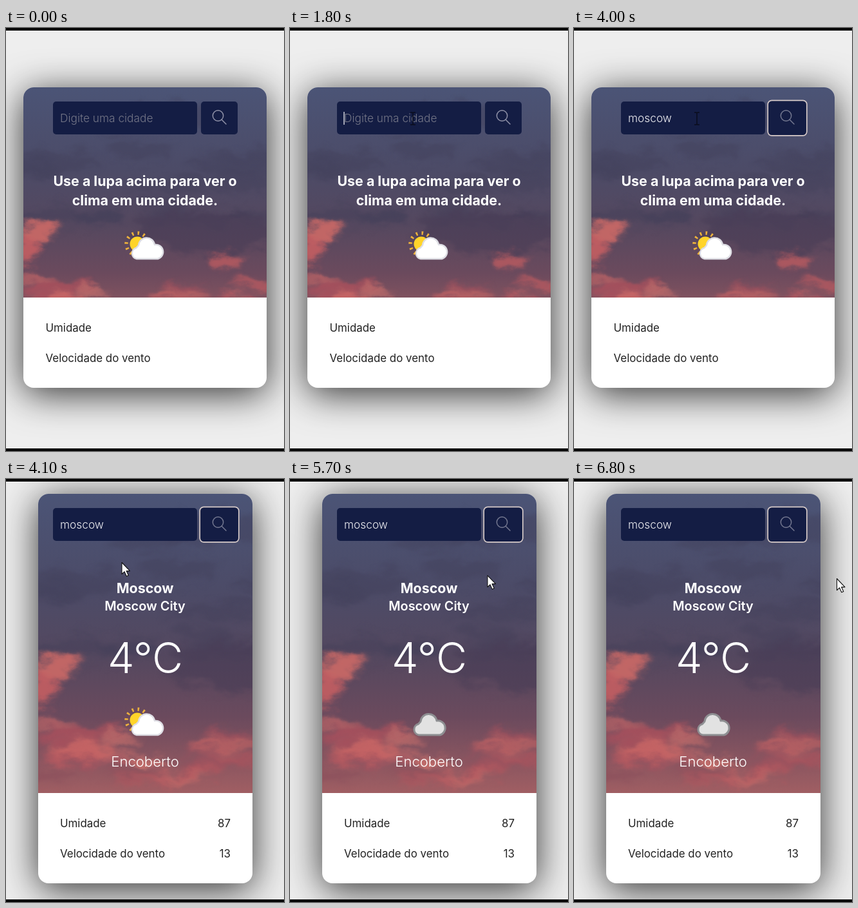
Recreate the animation shown at these times as an HTML page. Size 432 by 656 pixels, loop 7 s.

```html
<!DOCTYPE html>
<html lang="pt">
<head>
<meta charset="utf-8">
<title>Clima</title>
<style>
  html, body { margin: 0; width: 100%; height: 100%; overflow: hidden; background: #eee; }
  svg { display: block; width: 432px; height: 656px; font-family: Inter, sans-serif; }
  .shadow { fill: #fff; filter: drop-shadow(0 9px 29px rgba(0, 0, 0, .8)); }
  .middle { text-anchor: middle; fill: #fff; }
  .title { font-size: 21.4px; font-weight: 700; }
  .region { font-size: 19.9px; font-weight: 600; }
  .degrees { font-size: 66px; font-weight: 300; }
  .sky-text { font-size: 22.1px; font-weight: 300; }
  .field { font-size: 17.3px; font-weight: 300; }
  .info { font-size: 16.9px; fill: #222; }
  .end { text-anchor: end; }
  .button { fill: #141d44; }
</style>
</head>
<body>
<svg viewBox="0 0 432 656">
  <defs>
    <linearGradient id="dusk" x2="0" y2="1">
      <stop stop-color="#4b5476"/>
      <stop offset=".32" stop-color="#4c4b67"/>
      <stop offset=".55" stop-color="#55485f"/>
      <stop offset=".74" stop-color="#6b4a5d"/>
      <stop offset="1" stop-color="#a25f63"/>
    </linearGradient>
    <filter id="cloudy" filterUnits="userSpaceOnUse" x="-20" y="-20" width="420" height="430" color-interpolation-filters="sRGB">
      <feGaussianBlur stdDeviation="5" result="soft"/>
      <feTurbulence type="fractalNoise" baseFrequency=".025 .04" numOctaves="5" seed="4"/>
      <feDisplacementMap in="soft" scale="36" xChannelSelector="R" yChannelSelector="G"/>
    </filter>
    <g id="sky">
      <rect width="378" height="390" fill="url(#dusk)"/>
      <g id="clouds" filter="url(#cloudy)"></g>
    </g>
    <clipPath id="wideClip"><path d="M27 418V108a16 16 0 0 1 16-16H389a16 16 0 0 1 16 16V418Z"/></clipPath>
    <clipPath id="tallClip"><path d="M50 487V39a16 16 0 0 1 16-16H367a16 16 0 0 1 16 16V487Z"/></clipPath>
    <path id="cloud" d="M19 44A8.7 8.7 0 0 1 18.5 27L22 23A12.6 12.6 0 0 1 47 22A11.3 11.3 0 0 1 52 44Z" stroke-linejoin="round"/>
    <g id="sunny">
      <circle cx="20" cy="21" r="17" fill="none" stroke="#eeb23c" stroke-width="5.5" stroke-dasharray="2.6 6.3"/>
      <circle cx="20" cy="21" r="11.5" fill="#ffd42a"/>
      <use href="#cloud" fill="#fff" stroke="#dedee4" stroke-width="2.4"/>
    </g>
    <g id="details">
      <text class="info" x="61.5" y="471">Umidade</text>
      <text class="info" x="61.5" y="518">Velocidade do vento</text>
    </g>
  </defs>

  <rect width="432" height="656" fill="#eee"/>

  <g id="prompt">
    <rect class="shadow" x="27" y="92" width="378" height="466" rx="16"/>
    <g clip-path="url(#wideClip)"><use href="#sky" x="27" y="92"/></g>
    <text class="middle title" x="216" y="245">Use a lupa acima para ver o</text>
    <text class="middle title" x="216" y="275">clima em uma cidade.</text>
    <use href="#sunny" x="184" y="314"/>
    <use href="#details"/>
  </g>

  <g id="result">
    <rect class="shadow" x="50" y="23" width="333" height="604" rx="16"/>
    <g clip-path="url(#tallClip)"><use href="#sky" transform="translate(50 23) scale(1.2)"/></g>
    <text class="middle title" x="216" y="177">Moscow</text>
    <text class="middle region" x="216" y="204">Moscow City</text>
    <text class="middle degrees" x="216.5" y="301">4°C</text>
    <use id="partly" href="#sunny" x="184" y="353"/>
    <use id="overcast" href="#cloud" x="181" y="353" fill="#e2e2e2" stroke="#8e8f92" stroke-width="3"/>
    <text class="middle sky-text" x="216" y="446">Encoberto</text>
    <use href="#details" x="22.5" y="69"/>
    <text class="info end" x="349" y="540">87</text>
    <text class="info end" x="349" y="587">13</text>
  </g>

  <g id="search">
    <rect class="button" x="73" y="114" width="224" height="51" rx="5"/>
    <rect class="button" x="303" y="114" width="57" height="51" rx="5"/>
    <rect id="focus" class="button" x="301.2" y="112.4" width="60.6" height="54.4" rx="6" stroke="#d6cac8" stroke-width="1.7"/>
    <g id="lens" fill="none" stroke-width="1.5" stroke-linecap="round">
      <circle cx="329.5" cy="136" r="8.2"/><path d="M335.5 142.5L342 149"/>
    </g>
    <text id="query" class="field" x="84" y="146"></text>
    <path id="caret" d="M0 130V150" stroke="#fff" stroke-width="1.2"/>
  </g>

  <path id="beam" d="M-4-9.5H-1L0-8.5L1-9.5H4M0-8.5V8.5M-4 9.5H-1L0 8.5L1 9.5H4" fill="none" stroke="#0a0c1c" stroke-width="1.5"/>
  <path id="arrow" d="M.5.5V18.5L4.6 14.7L7.8 21.8L10.8 20.4L7.6 13.6H13Z" fill="#fff" stroke="#111" stroke-width="1.1" stroke-linejoin="round"/>
  <path d="M0 0H432V4H0ZM0 652H432V656H0Z" fill="#000"/>
</svg>
<script>
const el = id => document.getElementById(id);
const show = (id, on) => { el(id).style.display = on ? '' : 'none'; };
const clamp = (v, low, high) => Math.min(high, Math.max(low, v));

let seed = 11;
const random = () => (seed = seed * 16807 % 2147483647) / 2147483647;

const puff = (x, y, rx, ry, color, opacity) =>
  `<ellipse cx="${x}" cy="${y}" rx="${rx}" ry="${ry}" fill="${color}" opacity="${opacity}"/>`;

// From dull mauve (0) to bright coral (1).
const glow = k => `hsl(${347 + 18 * k} ${27 + 30 * k}% ${43 + 22 * k}%)`;

function paintClouds() {
  let art = '';
  for (let i = 0; i < 14; i++) {
    art += puff(random() * 378, 40 + random() * 200, 40 + random() * 50, 8 + random() * 12, '#413c57', .35);
  }
  art += puff(280, 225, 110, 34, '#483d56', .6);
  art += puff(22, 222, 26, 14, glow(.8), .9) + puff(8, 252, 18, 24, glow(.65), .9);
  art += puff(318, 268, 26, 14, glow(.6), .75);
  for (let i = 0; i < 30; i++) {
    const depth = random();
    art += puff(random() * 378, 296 + depth * 90, 18 + random() * 32, 4 + random() * 5, glow(random()), .75);
  }
  el('clouds').innerHTML = art;
}

// Pointer moves: start, end, then the point it settles on.
const entry = [415, 370];
const moves = [
  [100, 400, 345, 255], [800, 900, 281, 204], [1100, 1500, 191, 140.5],
  [4000, 4100, 179.5, 129], [5400, 6300, 408, 154]
];

function pointerAt(t) {
  let [x, y] = entry;
  for (const [start, end, toX, toY] of moves) {
    const left = 1 - clamp((t - start) / (end - start), 0, 1);
    x = toX + (x - toX) * left ** 2;
    y = toY + (y - toY) * left ** 4;
  }
  return [x, y];
}

// Three letters per burst, one every gap.
const burst = (t, start, gap) => clamp(Math.floor((t - start) / gap) + 1, 0, 3);

function draw(now) {
  const t = Math.floor(now % 7000 / 100) * 100;
  const done = t >= 4100, focused = t >= 3900;
  show('prompt', !done);
  show('result', done);
  show('partly', t < 4300);
  show('overcast', t >= 4300);
  show('focus', focused);
  el('search').setAttribute('transform', `translate(0 ${done ? -69 : 0})`);
  el('lens').setAttribute('stroke', focused ? '#747890' : '#9092a8');

  const text = 'moscow'.slice(0, burst(t, 2200, 150) + burst(t, 3000, 250));
  const query = el('query');
  query.textContent = text || 'Digite uma cidade';
  query.setAttribute('fill', text ? '#eeeef2' : '#747687');
  const caretX = text ? 84.6 + query.getComputedTextLength() : 84;
  el('caret').setAttribute('transform', `translate(${caretX} 0)`);
  show('caret', t >= 1800 && !focused);

  const beam = t >= 1400 && !done;
  const place = `translate(${pointerAt(t).join(' ')})`;
  show('beam', beam);
  show('arrow', t >= 100 && !beam);
  el('beam').setAttribute('transform', place);
  el('arrow').setAttribute('transform', place);
}

paintClouds();
const start = performance.now();
function tick() {
  draw(performance.now() - start);
  requestAnimationFrame(tick);
}
tick();
</script>
</body>
</html>
```
